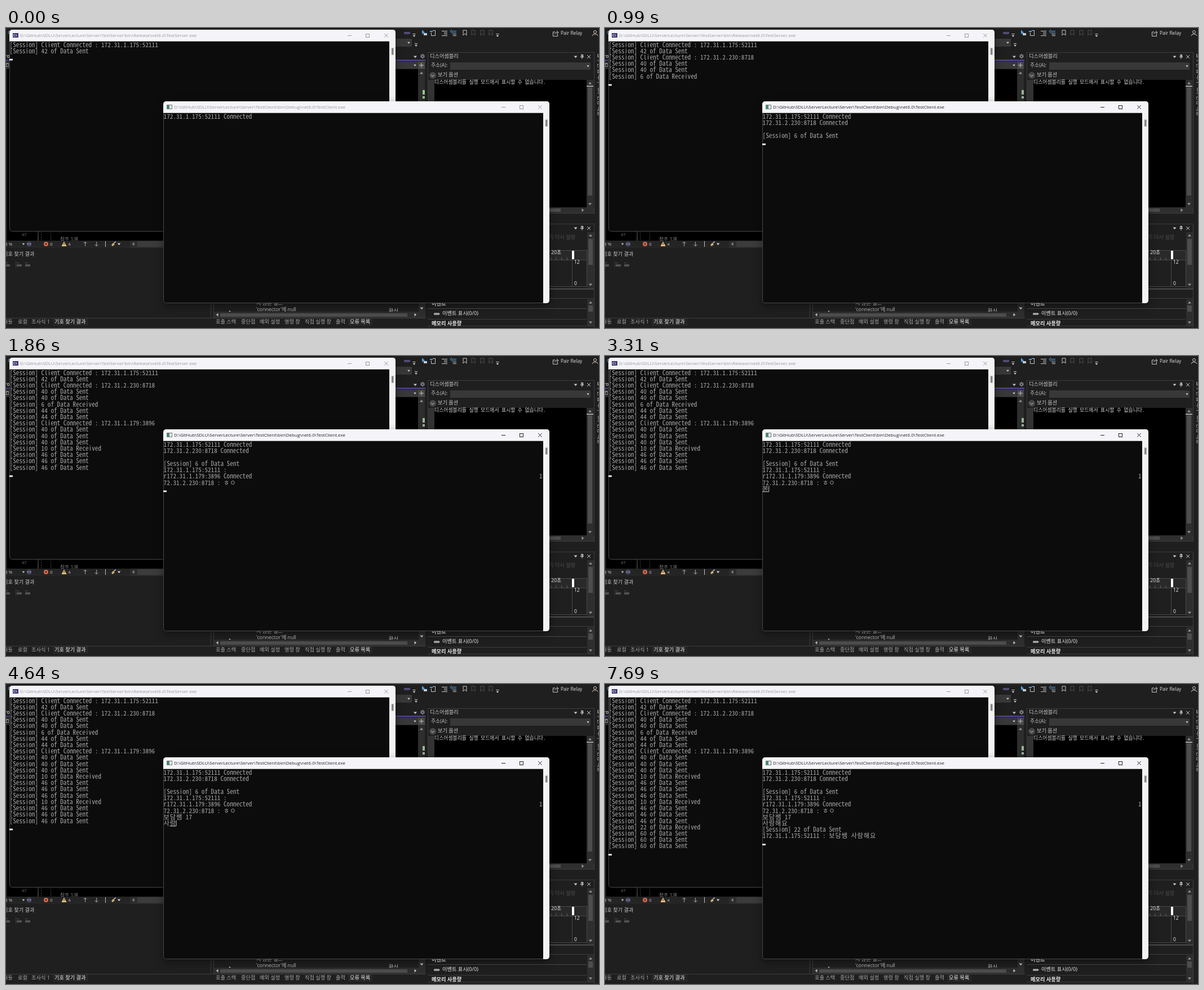
These frames come from a looping animation (1052 px wide and 532 px high, 8000 ms). An HTML page with a canvas:

```html
<!DOCTYPE html>
<html lang="ko">
<head>
<meta charset="utf-8">
<style>
html, body { margin: 0; width: 100%; height: 100%; overflow: hidden; background: #1f1f1f; }
canvas { display: block; }
</style>
</head>
<body>
<canvas id="stage" width="1052" height="532"></canvas>
<script>
const c = document.getElementById('stage').getContext('2d');
const LOOP = 8000, CELL = 5.6, ROW = 11.21;
const UI = '"Open Sans", "Noto Sans CJK KR", "Noto Sans CJK", sans-serif';
const MONO = '"Noto Sans Mono CJK KR", "Noto Sans CJK KR", "Noto Sans Mono", monospace';
const GREY = '#c8c8c8', DIM = '#505050', BLUE = '#4f9fe0';

// Console output: [time, text]
const joined = a => `[Session] Client Connected : 172.31.${a}`;
const sent = n => `[Session] ${n} of Data Sent`;
const received = n => `[Session] ${n} of Data Received`;
const server = [
  [0, joined('1.175:52111')], [0, sent(42)],
  [400, joined('2.230:8718')], [460, sent(40)], [530, sent(40)],
  [880, received(6)], [1070, sent(44)], [1070, sent(44)],
  [1530, joined('1.179:3896')], [1530, sent(40)], [1530, sent(40)], [1530, sent(40)],
  [1660, received(10)], [1760, sent(46)], [1860, sent(46)], [1860, sent(46)],
  [4330, received(10)], [4400, sent(46)], [4400, sent(46)], [4400, sent(46)],
  [5380, received(22)], [5380, sent(60)], [5380, sent(60)], [5380, sent(60)]
];

// Client steps: [time, row, text (null keeps it), cursor mode]
const OFF = 0, NEXT = 1, COMPOSE = 2, AFTER = 3;
const client = [
  [0, 0, '172.31.1.175:52111 Connected', OFF],
  [530, 1, '172.31.2.230:8718 Connected', OFF],
  [800, 1, null, NEXT],
  [880, 3, sent(6), NEXT],
  [1070, 4, '172.31.1.175:52111 :', NEXT],
  [1270, 5, 'r', AFTER], [1390, 5, null, OFF],
  [1530, 5, 'r172.31.1.179:3896 Connected', OFF],
  [1760, 5, 'r172.31.1.179:3896 Connected'.padEnd(119) + '1', OFF],
  [1760, 6, '72.31.2.230:8718 : ㅎㅇ', OFF],
  [1860, 6, null, NEXT], [2450, 6, null, OFF], [2980, 6, null, NEXT],
  [3080, 7, 'ㅂ', COMPOSE], [3200, 7, '보', COMPOSE], [3310, 7, '볻', COMPOSE],
  [3440, 7, '보다', COMPOSE], [3510, 7, '보담', COMPOSE],
  [3920, 7, '보담ㅆ', COMPOSE], [4010, 7, '보담쌔', COMPOSE], [4100, 7, '보담쌤', COMPOSE],
  [4250, 7, '보담쌤 ', AFTER], [4330, 7, '보담쌤 17', OFF],
  [4400, 8, 'ㅅ', COMPOSE], [4480, 8, '사', COMPOSE], [4560, 8, '사라', COMPOSE], [4640, 8, '사람', COMPOSE],
  [4920, 8, '사람ㅎ', COMPOSE], [5020, 8, '사람해', COMPOSE], [5140, 8, '사람해ㅇ', COMPOSE], [5260, 8, '사람해요', COMPOSE],
  [5380, 9, sent(22), OFF], [5380, 10, '172.31.1.175:52111 : 보담쌤 사람해요', NEXT],
  [6170, 10, null, OFF], [6700, 10, null, NEXT], [7180, 10, null, OFF], [7690, 10, null, NEXT]
];

function rect(color, x, y, w, h) {
  c.fillStyle = color;
  c.fillRect(x, y, w, h);
}
function text(s, x, y, color = GREY, size = 9.2, weight = 400) {
  c.font = `${weight} ${size}px ${UI}`;
  c.fillStyle = color;
  c.fillText(s, x, y);
}
function path(color, points, fill, width = 1) {
  c.beginPath();
  for (let i = 0; i < points.length; i += 2) c.lineTo(points[i], points[i + 1]);
  c.fillStyle = c.strokeStyle = color;
  c.lineWidth = width;
  fill ? c.fill() : c.stroke();
}
function circle(color, x, y, r, fill = true) {
  c.beginPath();
  c.arc(x, y, r, 0, 7);
  c.fillStyle = c.strokeStyle = color;
  c.lineWidth = 1;
  fill ? c.fill() : c.stroke();
}
function tri(x, y, angle = 0, color = GREY, r = 3) {
  c.save();
  c.translate(x, y);
  c.rotate(angle * Math.PI / 2);
  path(color, [-r, -r / 2, r, -r / 2, 0, r / 2 + .8], true);
  c.restore();
}
function cross(x, y, r, color) {
  path(color, [x - r, y - r, x + r, y + r]);
  path(color, [x + r, y - r, x - r, y + r]);
}
function overflow(x, y) {
  rect(GREY, x - 2.5, y - 2, 5, 1);
  tri(x, y + 2, 0, GREY, 2.5);
}
function panelButtons(y) {
  tri(1010.5, y);
  rect(GREY, 1020, y - 4, 4, 4);
  rect('#1f1f1f', 1021, y - 3, 1, 3);
  rect(GREY, 1019, y, 6, 1);
  rect(GREY, 1021.5, y, 1, 4);
  cross(1034, y, 3, GREY);
}
function vScroll(x, top, bottom, thumbTop, thumbBottom) {
  rect('#2e2e2e', x, top, 12, bottom - top);
  rect('#4d4d4d', x + 2, thumbTop, 8, thumbBottom - thumbTop);
  tri(x + 6, top + 6, 2, '#999');
  tri(x + 6, bottom - 6, 0, '#999');
}

function toolbar() {
  text('H0F', 706, 9, '#7c7ed0', 6, 700);
  overflow(724, 12);
  path(BLUE, [738, 3, 738, 11, 743, 8], true);
  rect(GREY, 741, 9, 6, 4);
  rect(BLUE, 752, 5, 5, 2);
  path(GREY, [754.5, 8, 754.5, 13.5, 761.5, 13.5, 761.5, 5]);
  rect(GREY, 757, 4, 5, 1);
  for (let i = 0; i < 4; i++) {
    rect(GREY, i % 3 ? 777 : 773, 5 + i * 2.7, i % 3 ? 6 : 10, 1);
    rect(i < 2 ? BLUE : GREY, 790 + i, 5 + i * 2.7, 9 - i, 1);
  }
  path(BLUE, [791, 3, 788, 6, 791, 9]);
  [814, 829, 845, 860].forEach((x, i) =>
    path(i ? DIM : GREY, [x - 3, 4, x + 3, 4, x + 3, 13, x, 10, x - 3, 13, x - 3, 4]));
  overflow(872, 12);
  path(GREY, [974, 7, 970.5, 7, 970.5, 14.5, 978.5, 14.5, 978.5, 11]);
  path(GREY, [973, 11, 975, 8, 980, 8]);
  path(GREY, [977, 5, 980, 8, 977, 11]);
  text('Pair Relay', 984, 10, '#e0e0e0', 8.4);
  circle(GREY, 1045, 7, 2.5, false);
  path(GREY, [1040, 14, 1042, 11, 1048, 11, 1050, 14]);
}

function editor(t) {
  circle(BLUE, 7, 8, 3, false);
  text('ro', -2, 51, '#eee', 8.5, 600);
  rect('#7160e8', 0, 56.5, 744, 1.2);
  rect('#2d2d30', 0, 58, 744, 15);
  rect('#999', 0, 62, 5, 7);
  rect('#333', 1, 64, 3, 4);
  rect('#000', 2, 73, 729, 304);
  rect('#383838', 690, 19, 30, 14);
  tri(714.5, 26, 0, GREY, 2.3);
  overflow(727.5, 29);
  tri(726, 51);
  circle(GREY, 739, 50, 2.2, false);
  for (let a = 0; a < 8; a++) {
    const x = Math.cos(a * Math.PI / 4), y = Math.sin(a * Math.PI / 4);
    path(GREY, [739 + 2.5 * x, 50 + 2.5 * y, 739 + 4 * x, 50 + 4 * y]);
  }
  rect('#383838', 690, 60, 40, 12);
  tri(725.5, 66, 0, GREY, 2.3);
  rect('#484848', 731, 60, 12, 13);
  rect(GREY, 733, 65.5, 8, 1);
  rect(GREY, 736.5, 62, 1, 8);
  rect('#2e2e2e', 731, 74, 12, 303);
  tri(737, 80, 2, '#999');
  const mark = t < 400 ? '#8bc78b' : '#9ab39a';
  rect(mark, 739, 110, 4, 8);
  rect(mark, 739, 121, 4, 4);

  // Last code rows and the status strip
  text('47', 28, 367, '#8a8a8a', 7.5);
  rect('#777', 56.5, 361, 1, 16);
  for (let y = 362; y < 376; y += 4) { rect('#555', 62, y, 1, 2); rect('#555', 79, y, 1, 2); }
  c.save();
  c.beginPath();
  c.rect(0, 361, 280, 16);
  c.clip();
  text('참조 1개', 96, 376, '#999', 8.8);
  c.restore();
  rect('#252526', 0, 377, 365, 13);
  text('8 %', -2, 383.5, GREY, 8);
  tri(31, 383, 0, GREY, 2.3);
  circle('#777aa8', 41, 383, 3.5, false);
  rect('#777aa8', 38, 382, 6, 2);
  circle('#d9694c', 71, 383, 4);
  cross(71, 383, 1.5, '#222');
  text('0', 78, 383.5, GREY, 8);
  path('#f2c879', [103, 378.5, 107.5, 387, 98.5, 387], true);
  rect('#222', 102.5, 381, 1, 4);
  text('4', 110, 383.5, GREY, 8);
  for (const [x, d] of [[140.5, -1], [160.5, 1]]) {
    path('#aaa', [x, 379, x, 387]);
    path('#aaa', [x - 3, 383 + d, x, 383 + 4 * d, x + 3, 383 + d]);
  }
  rect(GREY, 176, 378, 1, 10);
  path('#d0b070', [187, 385, 190, 381, 193, 384, 189, 387], true);
  path(GREY, [191, 382, 195, 378.5], false, 1.5);
  tri(200.5, 383, 0, GREY, 2.8);
  rect('#2e2e2e', 220, 377, 145, 13);
  rect('#3c3c3c', 233, 378, 60, 10);
  tri(226, 383, 1, '#888');
}

function bottomPanels() {
  text('기호 찾기 결과', -5, 402);
  for (const [x, w] of [[0, 7], [19, 9], [34, 9]]) {
    rect(DIM, x, 419, w, 4);
    rect(DIM, x, 416, w / 2, 1);
  }
  rect('#3a3a3a', 17, 413, 1, 12);
  rect('#3d3d3d', 363, 393, 1, 121);
  rect('#3d3d3d', 0, 514, 745, 1);
  rect('#3d3d3d', 368, 393, 1, 121);
  text('지 않은 필드', 444, 489);
  text("'connector'에 null", 444, 500, GREY, 8.8);
  tri(397, 502.5, 2, GREY, 2);
  text('확신', 679, 503);
  rect('#2e2e2e', 369, 503, 363, 11);
  rect('#4d4d4d', 380, 506, 332, 6);
  tri(375, 508.5, 1, '#bbb');
  tri(726, 508.5, 3, '#bbb');
  rect('#2e2e2e', 732, 488, 12, 26);
  tri(737.5, 497);
  rect('#272727', 83, 515, 63, 13);
  rect('#272727', 607, 515, 43, 13);
  const tabs = [['자동', -5], ['로컬', 21], ['조사식 1', 45], ['기호 찾기 결과', 86], ['호출 스택', 372], ['중단점', 417],
    ['예외 설정', 450], ['명령 창', 494], ['직접 실행 창', 530], ['출력', 585], ['오류 목록', 610]];
  for (const [s, x] of tabs) text(s, x, 521.5, x === 86 || x === 610 ? '#eee' : '#aaa');
}

function rightPanels() {
  rect('#3d3d3d', 748, 43, 295, 1);
  rect('#3d3d3d', 748, 43, 1, 286);
  rect('#3d3d3d', 1043, 43, 1, 286);
  text('디스어셈블리', 752, 51);
  panelButtons(51);
  text('주소(A):', 754, 67, GREY, 8.8);
  rect('#383838', 788, 61, 249, 13);
  tri(1032.5, 67.5, 0, GREY, 2.3);
  circle('#484848', 757, 84, 6);
  path(GREY, [754, 83, 757, 86, 760, 83]);
  text('보기 옵션', 766, 84);
  rect('#333', 749, 92, 11, 226);
  rect('#000', 760, 92, 270, 226);
  c.font = `8.85px ${MONO}`;
  c.fillStyle = '#d8d8d8';
  c.fillText('디스어셈블리를 실행 모드에서 표시할 수 없습니다.', 760, 96);
  vScroll(1030, 92, 318, 105, 297);
  rect(GREY, 1030, 102.5, 12, 1.5);
  rect('#2e2e2e', 749, 318, 294, 10);
  rect('#4d4d4d', 760, 320, 224, 6);
  tri(1023, 323, 3, '#999');
  rect('#3d3d3d', 748, 328, 296, 1);

  rect('#3d3d3d', 748, 347, 296, 1);
  rect('#3d3d3d', 1043, 347, 1, 185);
  panelButtons(355);
  text('기 다시 설정', 963, 372, DIM);
  rect('#292929', 950, 394, 80, 17);
  rect('#484848', 950, 394, 80, 1);
  rect('#484848', 950, 411, 80, 1);
  for (let x = 966; x < 1004; x += 9.6) rect('#666', x, 407, 1, 4);
  text('20초', 967, 399, '#eee', 8.8);
  rect('#fff', 1004, 395, 4, 15);
  rect('#484848', 1004, 411, 1, 48);
  rect('#484848', 950, 458, 80, 1);
  rect('#484848', 1030, 394, 1, 65);
  text('12', 1008, 416, '#eee', 8.5);
  text('0', 1008, 453.5, '#eee', 8.5);
  vScroll(1031, 362, 461, 374, 420);
  rect('#5a5a5a', 748, 462, 295, 1.5);
  rect('#3d3d3d', 748, 479, 295, 1);
  text('이벤트', 755, 489.5, '#eee', 9.2, 700);
  rect('#484848', 749, 497, 281, 1);
  for (let i = 0; i < 3; i++) circle('#aaa', 761 + i * 3, 507, 2);
  rect('#aaa', 759, 506.5, 11, 1);
  text('이벤트 표시(0/0)', 774, 507, '#eee');
  rect('#3d3d3d', 749, 516, 281, 1);
  text('메모리 사용량', 755, 524.5, '#eee', 9.2, 700);
  vScroll(1031, 481, 528, 492, 503);
  rect('#3d3d3d', 748, 528, 296, 1);

  c.save();
  c.translate(1052, 45);
  c.rotate(Math.PI / 2);
  text('솔루션 탐색기', 0, 0, '#bbb');
  text('Git 변경 내용', 60, 0, '#bbb');
  c.restore();
}

function consoleWindow(x, y, title, active, icon) {
  const w = 685, h = 358, ink = active ? '#222' : '#999';
  c.save();
  c.beginPath();
  c.roundRect(x, y, w, h, 5);
  c.fillStyle = '#0c0c0c';
  c.shadowColor = 'rgba(0, 0, 0, .4)';
  c.shadowBlur = 16;
  c.shadowOffsetY = 5;
  c.fill();
  c.shadowColor = 'transparent';
  c.clip();
  c.strokeStyle = '#484848';
  c.lineWidth = 2;
  c.stroke();
  rect('#f5f4f8', x, y, w, 20.7);
  rect('#f3f3f3', x + w - 11, y, 11, h);
  rect('#858585', x + w - 7, y + 32.5, 3.5, 12);
  icon(x, y);
  text(title, x + 19, y + 10.5, ink, 8);
  rect(ink, x + w - 85, y + 10, 7, 1);
  c.strokeStyle = ink;
  c.lineWidth = 1;
  c.strokeRect(x + w - 52.5, y + 7.5, 6, 6);
  cross(x + w - 16.5, y + 10.3, 3.3, ink);
  c.restore();
}
const isWide = ch => /[ㄱ-힣]/.test(ch);
const columns = s => [...s].reduce((n, ch) => n + (isWide(ch) ? 2 : 1), 0);
function consoleLine(s, x, y) {
  c.font = `11.2px ${MONO}`;
  c.fillStyle = '#aaa';
  let col = 0;
  for (const ch of s) {
    c.fillText(ch, x + col * CELL, y);
    col += columns(ch);
  }
}
const block = (x, y) => rect('#f2f2f2', x, y + 3, 6, 2.8);

function drawServer(t) {
  consoleWindow(6, 3, 'D:\\GitHub\\SDLU\\ServerLecture\\Server\\TestServer\\bin\\Release\\net6.0\\TestServer.exe', false, (x, y) => {
    rect('#3f3a72', x + 6, y + 6, 10, 8);
    text('C:\\', x + 7, y + 10.5, '#fff', 5, 700);
  });
  const lines = server.filter(([at]) => at <= t);
  lines.forEach(([, s], i) => consoleLine(s, 6.6, 29.3 + i * ROW));
  block(6, 29.3 + lines.length * ROW);
}

function drawClient(t) {
  consoleWindow(279, 130, 'D:\\GitHub\\SDLU\\ServerLecture\\Server\\TestClient\\bin\\Debug\\net6.0\\TestClient.exe', t >= 800, (x, y) => {
    rect('#777', x + 6, y + 6, 10, 8);
    rect('#e8eef2', x + 7, y + 7, 8, 6);
    rect('#3c8f70', x + 7, y + 7, 4, 6);
  });
  const rows = [];
  let row, mode;
  for (const [at, r, s, m] of client) {
    if (at > t) break;
    if (s !== null) rows[r] = s;
    row = r;
    mode = m;
  }
  rows.forEach((s, i) => consoleLine(s, 279.6, 157 + i * ROW));
  const y = 157 + row * ROW, end = 279 + columns(rows[row]) * CELL;
  if (mode === NEXT) block(279, y + ROW);
  if (mode === AFTER) block(end, y);
  if (mode === COMPOSE) path('#ccc', [end - 11, y + 5.2, end + .5, y + 5.2, end + .5, y - 5]);
}

function frame(now) {
  const t = now % LOOP;
  c.textBaseline = 'middle';
  rect('#1f1f1f', 0, 0, 1052, 532);
  toolbar();
  editor(t);
  bottomPanels();
  rightPanels();
  drawServer(t);
  drawClient(t);
  requestAnimationFrame(frame);
}
requestAnimationFrame(frame);
</script>
</body>
</html>
```
